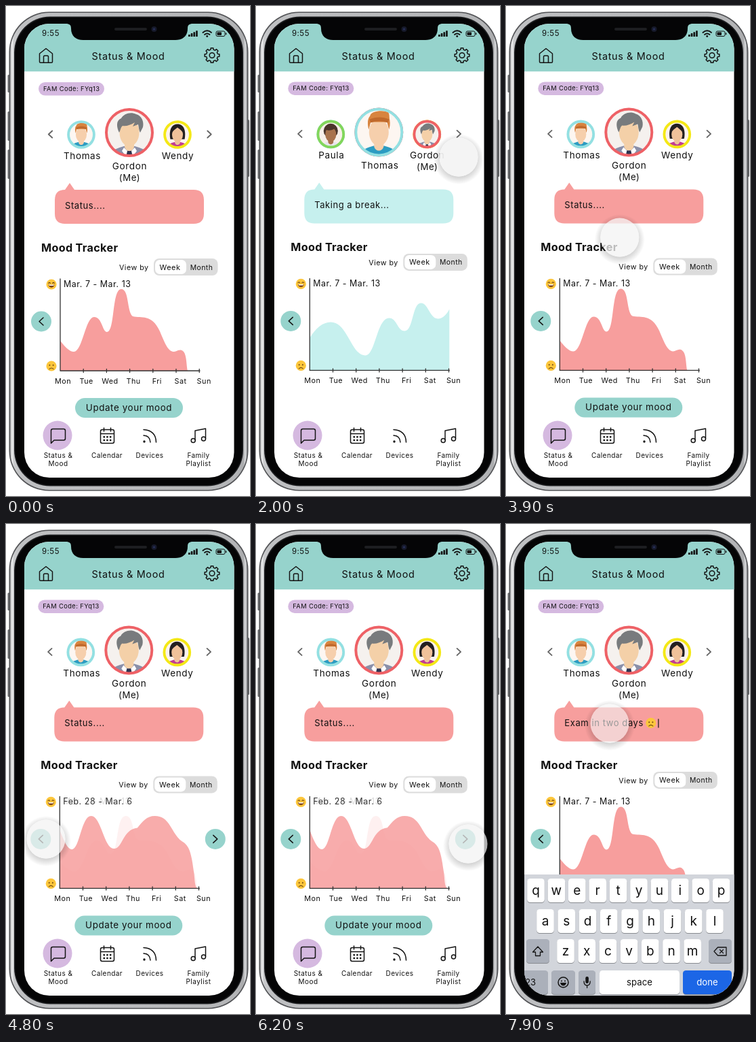
Recreate the animation shown at these times as an HTML page. Size 360 by 720 pixels, loop 8 s.

```html
<!DOCTYPE html>
<html lang="en">
<head>
<meta charset="utf-8">
<title>Status &amp; Mood</title>
<style>
html, body { margin: 0; width: 100%; height: 100%; overflow: hidden; background: #fff; }
svg { display: block; width: 360px; height: 720px; }
text { font-family: Inter, "Open Sans", sans-serif; font-weight: 400; letter-spacing: .045em; fill: #111; }
.mid { text-anchor: middle; }
.bold { font-weight: 700; letter-spacing: .02em; }
.key { text-anchor: middle; letter-spacing: 0; }
.line { fill: none; stroke: #151515; stroke-width: 1.5; stroke-linecap: round; stroke-linejoin: round; }
</style>
</head>
<body>
<svg id="stage" viewBox="0 0 360 720" xmlns="http://www.w3.org/2000/svg"></svg>
<script>
const TEAL = '#96d3cc', LILAC = '#d5b9e0', INK = '#151515';
const PINK = [247, 158, 157], AQUA = [198, 240, 238];
const LOOP = 8000, BASE = 536, LEFT = 80;

const rgb = c => `rgb(${c.map(Math.round)})`;
const rect = (x, y, w, h, r, fill, extra = '') =>
  `<rect x="${x}" y="${y}" width="${w}" height="${h}" rx="${r}" fill="${fill}" ${extra}/>`;
const circle = (x, y, r, fill, extra = '') =>
  `<circle cx="${x}" cy="${y}" r="${r}" fill="${fill}" ${extra}/>`;
const ring = (x, y, r) => circle(x, y, r, 'none', 'class="line"');
const shape = (d, fill) => `<path d="${d}" fill="${fill}"/>`;
const line = (d, style = '') => `<path class="line" d="${d}" style="${style}"/>`;
const text = (s, x, y, size, cls = '', extra = '') =>
  `<text x="${x}" y="${y}" font-size="${size}" class="${cls}" ${extra}>${s}</text>`;
const mid = (s, x, y, size) => text(s, x, y, size, 'mid');
const group = (id, body) => `<g id="${id}">${body}</g>`;

// Avatars are drawn in a circle of radius 36 around the origin.
const people = {
  gordon: { ring: '#ee6166', skin: '#f4d0a8', top: '#8a8fa8', back: '#f5f1ee',
    front: shape('M-15 0C-19-8-20-18-12-21C-8-28 2-31 10-27C18-25 22-16 20-8L16 0C14-3 14-8 13-12L5-9L8-15C2-11-5-9-10-10C-13-8-13-3-15 0Z', '#787b7d') +
      shape('M-8 22L0 30L8 22L11 27L4 36H-4L-11 27Z', '#fff') + shape('M-3 27H3L5 36H-5Z', '#2c3350') },
  thomas: { ring: '#93e0e2', skin: '#f6cfac', top: '#2c9cc2', back: '#fdf6f1',
    front: shape('M-15-4C-17-12-17-20-13-24C-12-31 6-33 14-29C16-26 15-22 16-18C17-12 16-8 15-4L12-15H-12Z', '#d8843f') +
      shape('M-14-19C-4-23 6-23 15-19L13-14C4-17-4-17-12-14Z', '#c0692c') },
  wendy: { ring: '#f4e816', skin: '#f0c19a', top: '#c23c93', back: '#fdf3ee',
    behind: shape('M-19 12C-23-8-18-28 0-28C18-28 23-8 19 12Z', '#231f20'),
    front: shape('M-16-2C-17-16-10-24 0-24C10-24 17-16 16-2C13-10 6-14 0-19C-6-14-13-10-16-2Z', '#231f20') },
  paula: { ring: '#82d65c', skin: '#a8724c', top: '#e8e4ee', back: '#f7efe9',
    behind: circle(0, -9, 19, '#4b352b'),
    front: shape('M-16 0C-20-14-14-27 0-27C14-27 20-14 16 0C14-5 13-10 9-14C2-9-8-9-12-12C-14-8-14-4-16 0Z', '#4b352b') }
};
function avatar(name, x, y, r) {
  const p = people[name];
  return `<g transform="translate(${x} ${y}) scale(${r / 36})">
    ${circle(0, 0, 34, p.back)}<g clip-path="url(#face)">${p.behind || ''}
    ${shape('M-30 40C-30 26-18 23-8 20H8C18 23 30 26 30 40Z', p.top)}
    ${shape('M-7 8H7V21C5 29-5 29-7 21Z', p.skin)}
    <ellipse cx="0" cy="0" rx="14.5" ry="20" fill="${p.skin}"/>${p.front}</g>
    ${circle(0, 0, 34, 'none', `stroke="${p.ring}" stroke-width="${r > 30 ? 4 : 7}"`)}</g>`;
}
const avatars = (a, b, c) =>
  avatar(a, 111, 189, 20) + avatar(b, 182, 186, 36) + avatar(c, 253, 189, 20);

function emoji(x, y, mood) {
  const thin = 'stroke:#6b4412;stroke-width:1.1';
  const face = mood === 'happy'
    ? line('M-4.4-1.6Q-3-3.6-1.6-1.6M1.6-1.6Q3-3.6 4.4-1.6', thin) +
      shape('M-4.5 .5H4.5C4 6-4 6-4.5 .5Z', '#7a3d14') + rect(-3.6, .6, 7.2, 1.5, .5, '#fff')
    : circle(-2.6, -1.2, 1, '#6b4412') + circle(2.6, -1.2, 1, '#6b4412') + line('M-3 4.4Q0 1.6 3 4.4', thin);
  return `<g transform="translate(${x} ${y})">${circle(0, 0, 7.6, '#fcc63c')}${face}</g>`;
}

const charts = {
  week: { right: 268, top: 416,
    d: 'M80 492C88 502 94 508 100 508C113 508 117 457 130 457C142 457 142 479 149 479C161 479 156 416 170 416C182 416 178 449 187 456C200 459 215 452 227 478C236 500 240 507 247 508C252 508 256 503 261 507C267 511 266 530 268 536H80Z' },
  other: { right: 286, top: 437,
    d: 'M80 488C89 474 99 465 111 465C136 465 141 514 162 514C177 514 179 459 197 459C209 459 209 478 220 478C233 478 231 437 244 437C255 437 257 460 269 460C277 460 283 452 286 446V536H80Z' },
  past: { right: 286, top: 432,
    d: 'M80 452C86 468 92 480 98 480C110 480 112 432 127 432C142 432 146 479 161 479C174 479 174 451 196 449C204 440 210 432 222 432C245 432 246 456 262 468C272 474 276 480 280 510C282 520 281 534 286 536H80Z' }
};

const chevron = (x, y, dir, w, h) => `M${x + dir * w} ${y - h}L${x - dir * w} ${y}L${x + dir * w} ${y + h}`;
const roundButton = (x, dir) => circle(x, 463.5, 15, TEAL) + line(chevron(x, 463.5, dir, 3, 5.5));

function gear(cx, cy) {
  const pts = [];
  for (let i = 0; i < 8; i++)
    for (const [da, r] of [[-.24, 8.6], [-.16, 11], [.16, 11], [.24, 8.6]]) {
      const a = i * Math.PI / 4 + da;
      pts.push((cx + r * Math.cos(a)).toFixed(2) + ' ' + (cy + r * Math.sin(a)).toFixed(2));
    }
  return line('M' + pts.join('L') + 'Z') + ring(cx, cy, 3.8);
}

function phone() {
  const side = (x, y, h) => rect(x, y, 5, h, 1.5, '#6b6c6f');
  return side(2.5, 101, 26) + side(2.5, 155, 43) + side(2.5, 211, 43) + side(354, 167, 84) +
    rect(4.5, 8.5, 353, 704, 59, '#515255') + rect(6, 10, 350, 701, 58, 'url(#metal)') +
    rect(12, 15.5, 338, 690, 53, '#1d1e20') + rect(13.5, 17, 335, 687, 52, '#050506');
}

function header() {
  let s = rect(27, 20, 310, 76.2, 0, TEAL);
  s += shape('M88 20H276V26C270 26 268 28 268 33C268 44 261 50 250 50H114C103 50 96 44 96 33C96 28 94 26 88 26Z', '#050506');
  s += rect(160, 32, 48, 4, 2, '#1d1e21') + circle(218.5, 34, 4, '#171a2b') + circle(218.5, 34, 1.6, '#27305a');
  s += text('9:55', 53, 44, 11.4);
  for (let i = 0; i < 4; i++) s += rect(269 + i * 3.7, 42 - i * 1.9, 2.7, 3 + i * 1.9, .6, INK);
  s += line('M290.5 39Q296.7 33.5 303 39M293 42Q296.7 38.8 300.5 42', 'stroke-width:1.9') + circle(296.7, 44.5, 1.4, INK);
  s += rect(310, 37, 13, 7.5, 2, 'none', `stroke="${INK}"`) + rect(311.5, 38.5, 6.5, 4.5, .8, INK) + rect(324, 39.3, 1.3, 3, .6, INK);
  s += line('M49.5 70L59 62.5L68.5 70V82Q68.5 83.3 67 83.3H51Q49.5 83.3 49.5 82ZM55.5 83V75Q55.5 73 57 73H61Q62.5 73 62.5 75V83');
  return s + mid('Status &amp; Mood', 180.5, 78.5, 14.4) + gear(304, 72.5);
}

function bubble() {
  return `<path id="bubble" d="M87 270L94 260L101 270H277Q292 270 292 285V305Q292 320 277 320H87Q72 320 72 305V285Q72 270 87 270Z"/>` +
    group('statusA', text('Status....', 87, 298, 13)) +
    group('statusB', text('Taking a break...', 87, 298, 12.9)) +
    group('statusC', text('Exam in two days', 87, 298, 13) + emoji(214.5, 293, 'sad') + rect(225, 287, 1.2, 13, 0, INK));
}

function tracker() {
  let s = text('Mood Tracker', 52, 360.5, 16.2, 'bold');
  s += group('range', text('View by', 167, 388, 10.7) + rect(218, 371, 94.5, 25, 8, '#dcdcdc') +
    rect(220, 373, 46, 21, 7, '#fff') + mid('Week', 242, 387.5, 10.9) + mid('Month', 288.5, 387.5, 10.4));
  for (const id in charts) s += `<path id="${id}" d="${charts[id].d}"/>`;
  let axis = 'M80 401V536H286';
  for (let i = 1; i < 7; i++) axis += `M${80 + i * 34.2} 533.5V538.5`;
  s += line(axis, 'stroke:#333;stroke-width:1.3');
  s += group('dateA', text('Mar. 7 - Mar. 13', 85, 413, 12.4)) + group('dateB', text('Feb. 28 - Mar. 6', 85, 413, 12.4));
  s += emoji(67, 409, 'happy') + emoji(67, 529, 'sad');
  s += roundButton(52, 1) + group('next', roundButton(309.5, -1));
  ['Mon', 'Tue', 'Wed', 'Thu', 'Fri', 'Sat', 'Sun'].forEach((d, i) => s += mid(d, 84 + i * 34.7, 555, 10.8));
  return s + group('update', rect(102, 576, 159, 29, 14.5, TEAL) + mid('Update your mood', 181.5, 595, 13.4));
}

function content() {
  const grey = 'stroke:#666;stroke-width:1.9';
  const me = (x, y) => mid('Gordon', x, y, 13.6) + mid('(Me)', x, y + 17, 13.2);
  return rect(48, 112, 97, 19.5, 9.7, LILAC) + text('FAM Code: FYq13', 55, 125, 9.3) +
    line(chevron(65.5, 188.5, 1, 2.7, 5), grey) + line(chevron(300, 188.5, -1, 2.7, 5), grey) +
    avatars('thomas', 'gordon', 'wendy') + group('avatarsB', avatars('paula', 'thomas', 'gordon')) +
    group('namesA', mid('Thomas', 112.5, 224.5, 13.5) + me(182.5, 240) + mid('Wendy', 253.5, 224.5, 13.5)) +
    group('namesB', mid('Paula', 112, 224.5, 13.5) + mid('Thomas', 183.5, 240, 13.6) + me(253.5, 224.5)) +
    bubble() + tracker();
}

function tabs() {
  const label = (s, x, y) => mid(s, x, y, 10);
  let s = circle(76, 631, 21.5, LILAC) + line('M66.5 642.5V624Q66.5 621.5 69 621.5H85Q87.5 621.5 87.5 624V635.5Q87.5 638 85 638H71Z');
  s += line('M142 622.5H157Q159.5 622.5 159.5 625V640Q159.5 642.5 157 642.5H142Q139.5 642.5 139.5 640V625Q139.5 622.5 142 622.5ZM139.5 628.5H159.5M144.5 620V625M154.5 620V625');
  for (let i = 0; i < 6; i++) s += rect(143.5 + (i % 3) * 4.7, 632 + (i > 2) * 4.7, 2.5, 2.5, .4, INK);
  s += line('M203 631Q212.5 631.5 213 641M203 622.5Q221 623.5 221.5 641') + circle(204, 640, 1.7, INK);
  s += line('M279 638V624L294.5 621V635.5') + ring(276.2, 638.5, 3) + ring(291.5, 636, 3);
  return s + label('Status &amp;', 77, 664) + label('Mood', 77, 676) + label('Calendar', 149, 664) +
    label('Devices', 212, 664) + label('Family', 284, 664) + label('Playlist', 284, 676);
}

function keyboard() {
  const grey = '#abb0ba', thin = 'stroke-width:1.3';
  const key = (x, y, w, fill = '#fff') => rect(x, y + 1, w, 35, 4.5, '#898c91') + rect(x, y, w, 35, 4.5, fill);
  const label = (s, x, y, size, extra) => text(s, x, y, size, 'key', extra);
  let s = rect(27, 515, 310, 185, 0, '#d2d5db');
  [['qwertyuiop', 44, 30.4, 521], ['asdfghjkl', 58, 31.25, 566], ['zxcvbnm', 88, 31.2, 610]].forEach(([keys, x, step, y]) =>
    [...keys].forEach((c, i) => s += key(x + i * step - 12.8, y, 25.6) + label(c, x + i * step, y + 24, 19)));
  s += key(30, 610, 34, grey) + line('M47 621L39.5 629H43.5V634.5H50.5V629H54.5Z', thin);
  s += key(299, 610, 34, grey) + line('M307 628L312.5 622H325V634H312.5ZM315.5 625.5L320.5 630.5M320.5 625.5L315.5 630.5', thin);
  s += key(16, 656, 46, grey) + label('123', 33.5, 678, 13) + key(67, 656, 35, grey) + key(107, 656, 25, grey);
  s += ring(84.5, 673.5, 7.5) + circle(82, 671.5, 1, INK) + circle(87, 671.5, 1, INK) + shape('M80 674H89C88 680 81 680 80 674Z', INK);
  s += rect(117.3, 665, 4.6, 10, 2.3, INK) + line('M115 672Q115 678 119.6 678Q124.2 678 124.2 672M119.6 678V681.5', thin);
  s += key(138, 656, 118) + label('space', 197, 678, 13.2) + key(261, 656, 72, '#1c66e6');
  return s + label('done', 297, 678, 13.2, 'style="fill:#fff"');
}

const stops = (...list) => list.map(([o, c]) => `<stop offset="${o}" stop-color="${c}"/>`).join('');
const stage = document.getElementById('stage');
stage.innerHTML = `<defs>
  <clipPath id="screen">${rect(27, 26, 309.5, 667, 37, INK)}</clipPath>
  <clipPath id="face">${circle(0, 0, 34, INK)}</clipPath>
  <linearGradient id="metal">${stops([0, '#8b8c8f'], [.008, '#f1f1f2'], [.016, '#c9cacc'], [.05, '#bfc0c2'],
    [.95, '#b4b5b7'], [.984, '#a9aaac'], [.992, '#dcdddf'], [1, '#85868a'])}</linearGradient>
  <radialGradient id="shade"><stop offset=".7" stop-opacity=".17"/><stop offset="1" stop-opacity="0"/></radialGradient>
  <mask id="rim">${rect(-50, -50, 100, 100, 0, '#fff')}${circle(0, 0, 28.5, '#000')}</mask></defs>
  ${phone()}<g clip-path="url(#screen)">${rect(27, 26, 310, 668, 0, '#fff')}${header()}
  ${group('content', content())}${tabs()}${group('keys', keyboard())}</g>
  ${group('touch', `<g mask="url(#rim)">${circle(0, 3, 37, 'url(#shade)')}</g>` + circle(0, 0, 28.5, '#f3f3f3', 'id="pad"'))}`;

const el = id => document.getElementById(id);
const clamp = v => Math.max(0, Math.min(1, v));
const ease = v => v * v * (3 - 2 * v);
const ramp = (t, a, b) => clamp((t - a) / (b - a));
const mix = (a, b, p) => a + (b - a) * p;
const fade = (id, v) => { el(id).style.opacity = v; };
const move = (id, x, y) => el(id).setAttribute('transform', `translate(${x} ${y})`);

// time, x, y, pad opacity, overall opacity
const path = [
  [500, 130, 320, .92, 0], [650, 120, 285, .92, 1], [950, 77, 187, .78, 1], [1350, 77, 187, .78, 1],
  [2000, 299, 222, .92, 1], [2350, 296, 195, .8, 1], [3400, 296, 195, .8, 1],
  [4350, 59, 463, .72, 1], [5000, 59, 463, .72, 1], [5850, 313, 470, .72, 1],
  [6500, 313, 470, .72, 1], [7150, 153, 293, .6, 1], [8000, 153, 293, .6, 1]
];
function touchAt(t) {
  if (t <= path[0][0]) return path[0];
  const i = path.findIndex(k => k[0] >= t), a = path[i - 1], b = path[i];
  const p = ease(ramp(t, a[0], b[0]));
  return a.map((v, j) => mix(v, b[j], p));
}

function place(id, right, top, opacity, fill) {
  const c = charts[id];
  const sx = (right - LEFT) / (c.right - LEFT), sy = (BASE - top) / (BASE - c.top);
  el(id).setAttribute('transform', `translate(${LEFT} ${BASE}) scale(${sx} ${sy}) translate(${-LEFT} ${-BASE})`);
  el(id).setAttribute('fill', fill);
  fade(id, opacity);
}

function draw(t) {
  const swap = ease(ramp(t, 1200, 1500) - ramp(t, 2950, 3250));
  const past = ramp(t, 4545, 4845) - ramp(t, 6155, 6455);
  const typed = ease(ramp(t, 7400, 7650));
  const tint = rgb(PINK.map((c, i) => mix(c, AQUA[i], swap)));

  const settled = t < 1350 ? 0 : 1;
  move('content', -.7 * settled, -.6 * settled);
  move('range', 0, -6.5 * Math.max(swap, typed));
  fade('avatarsB', swap);
  fade('namesA', 1 - swap);
  fade('namesB', swap);
  fade('update', 1 - swap);
  fade('statusA', (1 - swap) * (1 - typed));
  fade('statusB', swap);
  fade('statusC', typed);
  el('bubble').setAttribute('fill', tint);

  // Outgoing and incoming charts share one box and tint while they cross-fade.
  const goal = past > 0 ? charts.past : charts.other, p = past || swap;
  const right = mix(charts.week.right, goal.right, p), top = mix(charts.week.top, goal.top, p);
  place('other', right, top, swap, tint);
  place('past', right, top, past, tint);
  place('week', right, top, 1 - p, tint);
  fade('dateA', 1 - past);
  fade('dateB', past);
  fade('next', clamp(past * 1.2));

  move('keys', 0, 180 * (1 - typed));
  const [, x, y, pad, show] = touchAt(t);
  move('touch', x, y);
  fade('touch', show);
  fade('pad', pad);
}

const start = performance.now();
function tick() {
  draw((performance.now() - start) % LOOP);
  requestAnimationFrame(tick);
}
tick();
</script>
</body>
</html>
```
